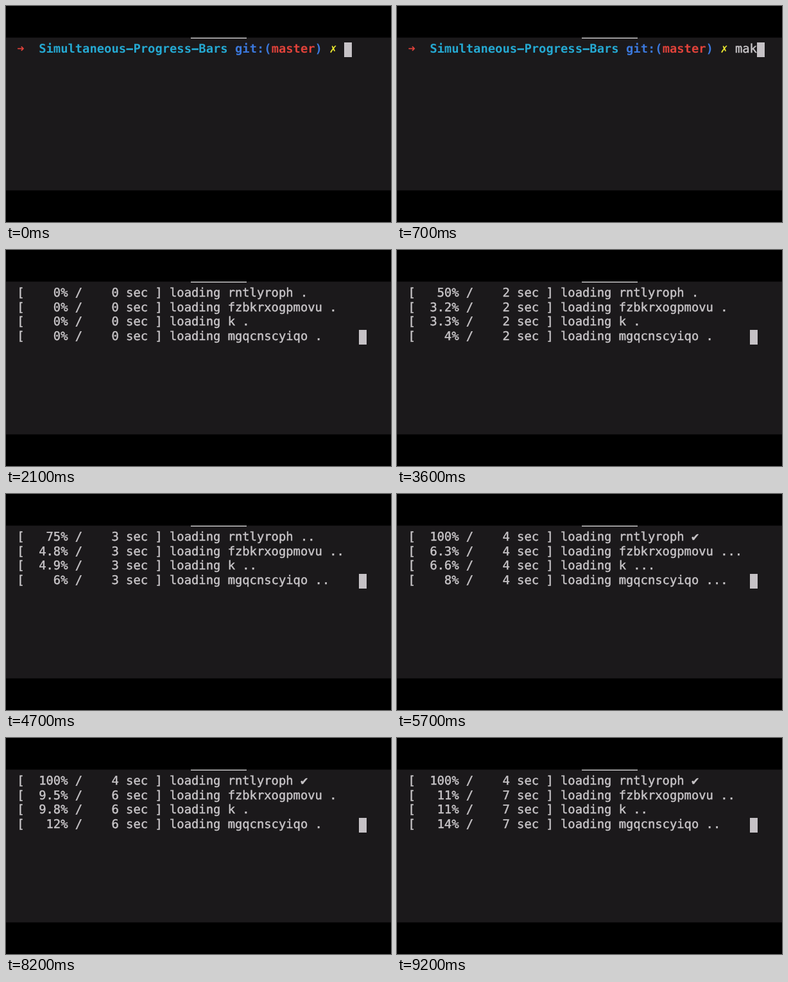
These frames come from a looping animation (600 by 338 pixels, 9.3 s). An HTML page:

```html
<!DOCTYPE html>
<html lang="en">
<head>
<meta charset="utf-8">
<title>Terminal progress bars</title>
<style>
  html, body { margin: 0; width: 100%; height: 100%; overflow: hidden; background: #000; }
  div, pre { position: absolute; margin: 0; }
  #term {
    left: 0; top: 49px; width: 600px; height: 238px; background: #1b191b;
    border: solid #0e0d0e; border-width: 1px 0;
  }
  #tab { left: 288px; top: 50px; width: 87px; height: 1px; background: #c8c6c8; box-shadow: 0 -1px #666; }
  #text {
    left: 17.2px; top: 57.1px; color: #c8c5c8;
    font: 18.82px/22.67px "DejaVu Sans Mono", monospace;
    text-rendering: geometricPrecision; font-variant-ligatures: none;
    -webkit-text-stroke: 0.45px;
  }
  #cursor { width: 12px; height: 23px; background: #c6c2c6; }
  b { -webkit-text-stroke: 0; }
  b i { font-style: normal; display: inline-block; width: 1ch; }
  .dash { display: inline-block; transform: scaleX(1.8); }
  .red { color: #e0423a; }
  .cyan { color: #25a9d2; }
  .blue { color: #3b78dc; }
  .yellow { color: #ece92f; }
</style>
</head>
<body>
<div id="term"></div>
<div id="tab"></div>
<div id="cursor"></div>
<pre id="text"></pre>
<script>
const LOOP = 9300, COL = 11.33, ROW = 22.67;
const text = document.getElementById('text');
const cursor = document.getElementById('cursor');

const dash = '<span class="dash">-</span>';
const prompt = '<b><i class="red">➜</i>  <span class="cyan">' +
  ['Simultaneous', 'Progress', 'Bars'].join(dash) +
  '</span> <span class="blue">git:(<span class="red">master</span>)</span> ' +
  '<i class="yellow">✗</i></b> ';
const compile = `g++ ${dash}o loading exp_loadingBar.cpp`;

// name and total seconds of each job
const jobs = [['rntlyroph', 4], ['fzbkrxogpmovu', 63], ['k', 61], ['mgqcnscyiqo', 50]];

function jobLine([name, total], seconds, dots) {
  const sec = Math.min(seconds, total);
  const percent = String(Number((100 * sec / total).toPrecision(2)));
  const mark = sec === total ? '✔' : '.'.repeat(dots);
  return `[${percent.padStart(5)}% /${String(sec).padStart(5)} sec ] loading ${name} ${mark}`;
}

function scene(t) {
  if (t < 1200) {
    const typed = t < 100 ? 0 : Math.min(4, 1 + Math.floor((t - 100) / 250));
    return [prompt + 'make'.slice(0, typed), 45 + typed, 0];
  }
  if (t < 1300) return ['', 0, 0];
  if (t < 1900) return [compile, 0, 1];

  // dots advance about every 253 ms, snapped to 100 ms ticks
  const tick = Math.floor((t - 1900) / 100);
  const step = Math.ceil((tick + 0.775) / 2.53) - 1;
  const seconds = Math.floor((step + 1) / 4);
  const dots = (step + 2) % 3 + 1;
  return [jobs.map(job => jobLine(job, seconds, dots)).join('\n'), 47, 3];
}

let shown = null;
const start = performance.now();

function draw() {
  const [html, col, row] = scene((performance.now() - start) % LOOP);
  if (html !== shown) text.innerHTML = shown = html;
  cursor.style.left = Math.round(17.2 + col * COL) + 'px';
  cursor.style.top = Math.round(57.2 + row * ROW) + 'px';
  requestAnimationFrame(draw);
}
draw();
</script>
</body>
</html>
```
